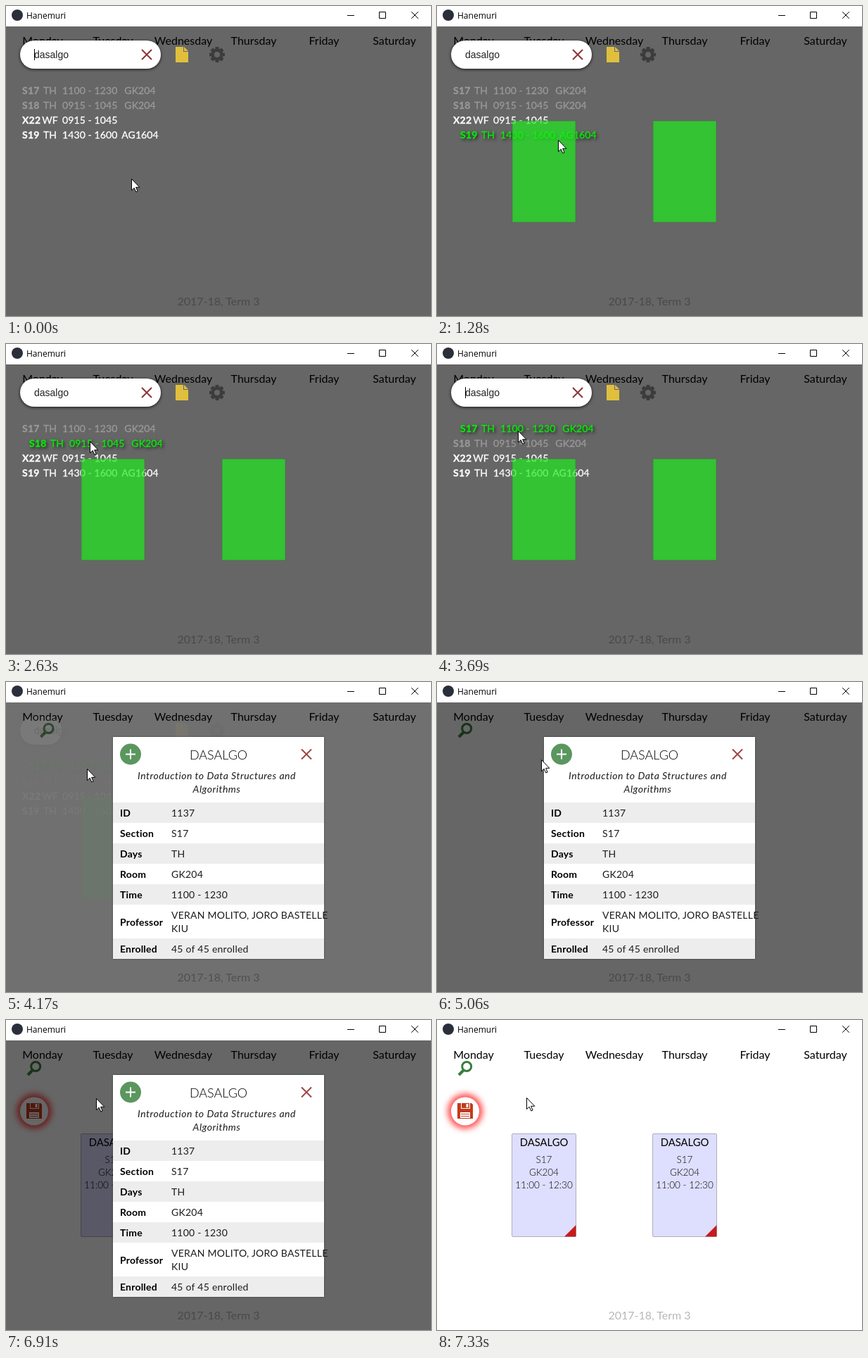
Animation of 604 by 440 pixels, one loop 7.65 s. Source, as an HTML page:

```html
<!DOCTYPE html>
<html lang="en">
<head>
<meta charset="utf-8">
<title>Class schedule</title>
<style>
  html, body { margin: 0; width: 100%; height: 100%; overflow: hidden; background: #fff; }
  svg { display: block; font: 14px Lato, Carlito, sans-serif; }
  text { white-space: pre; }
  .mid { text-anchor: middle; }
  .day, .term { font-size: 16px; }
  .term { fill: #b8b8b8; }
  .bar { font: 12px "Open Sans", sans-serif; }
  .tip { font: 12px "Open Sans", sans-serif; fill: #575757; }
  .query { font: 14px "Liberation Sans", Arial, sans-serif; fill: #222; }
  .row { stroke-width: .3px; letter-spacing: .1px; }
  .bold { font-weight: 700; letter-spacing: .2px; }
  .value { letter-spacing: .25px; fill: #1c1c1c; }
  .name { font-size: 18px; font-weight: 300; }
  .sub { font-style: italic; letter-spacing: .5px; fill: #1c1c1c; }
  .course { font-size: 14.8px; }
  .info { font-size: 13.5px; font-weight: 300; }
  .line { fill: none; }
</style>
</head>
<body>
<svg id="stage" width="604" height="440" viewBox="0 0 604 440"></svg>
<script>
const LOOP = 7650;
const DAYS = ['Monday', 'Tuesday', 'Wednesday', 'Thursday', 'Friday', 'Saturday'];

// Bursts of motion: first step, last step, number of steps
const BURSTS = [
  [380, 870, 7], [1280, 1280, 1], [1440, 1740, 5], [2030, 2300, 4], [2550, 2910, 5],
  [3250, 3250, 1], [3690, 3690, 1], [4110, 4290, 4], [4730, 5450, 11], [5880, 5880, 1],
  [6050, 6110, 2], [6570, 7150, 9], [7330, 7330, 1]
];

// Sections: code, days, time, room, full, hover start, hover end
const SECTIONS = [
  ['S17', 'TH', '1100 - 1230', 'GK204', true, 2640, 9999],
  ['S18', 'TH', '0915 - 1045', 'GK204', true, 2130, 2640],
  ['X22', 'WF', '0915 - 1045', '', false, 1500, 2130],
  ['S19', 'TH', '1430 - 1600', 'AG1604', false, 600, 1500]
];

const DETAILS = [
  ['ID', '1137'], ['Section', 'S17'], ['Days', 'TH'], ['Room', 'GK204'],
  ['Time', '1100 - 1230'], ['Professor', 'VERAN MOLITO, JORO BASTELLE', 'KIU'],
  ['Enrolled', '45 of 45 enrolled']
];

// Pointer path: time, x, y
const PATH = [
  [320, 178, 245], [640, 172, 190], [1400, 172, 190], [1740, 150, 160], [1980, 150, 160],
  [2120, 122, 149], [2270, 120, 140], [2500, 120, 140], [2850, 115, 123], [4690, 115, 123],
  [5200, 166, 103], [6540, 166, 103], [6850, 128, 111], [7300, 128, 111], [7330, 127, 110]
];

const CARET_ON = [[0, 380], [780, 1280], [1740, 2210], [2720, 3250], [3690, 4110]];

const ramp = (t, start, length) => Math.min(1, Math.max(0, (t - start) / length));
const text = (x, y, cls, s, extra = '') => `<text x="${x}" y="${y}" class="${cls}" ${extra}>${s}</text>`;
const rect = (x, y, w, h, fill, extra = '') =>
  `<rect x="${x}" y="${y}" width="${w}" height="${h}" fill="${fill}" ${extra}/>`;
const path = (d, fill, extra = '') => `<path d="${d}" fill="${fill}" ${extra}/>`;
const line = (d, color, width) => path(d, 'none', `stroke="${color}" stroke-width="${width}"`);
const circle = (x, y, r, fill, extra = '') => `<circle cx="${x}" cy="${y}" r="${r}" fill="${fill}" ${extra}/>`;
const layer = (alpha, s, move = 0) =>
  alpha > 0 ? `<g opacity="${alpha}" transform="translate(${move})">${s}</g>` : '';
const cross = (x, y, r, color, width) =>
  line(`M${x - r} ${y - r}l${2 * r} ${2 * r}m0 ${-2 * r}l${-2 * r} ${2 * r}`, color, width);

function held(t) {
  let step = 0;
  for (const [a, b, n] of BURSTS)
    for (let i = 0; i < n; i++) {
      const at = n > 1 ? a + (b - a) * i / (n - 1) : a;
      if (at <= t) step = at;
    }
  return step;
}

function pointer(t) {
  let i = PATH.findIndex(k => k[0] > t);
  if (i < 0) i = PATH.length;
  const b = PATH[Math.min(i, PATH.length - 1)], a = PATH[Math.max(i - 1, 0)];
  const p = a === b ? 0 : ramp(t, a[0], b[0] - a[0]);
  const x = Math.round(a[1] + (b[1] - a[1]) * p), y = Math.round(a[2] + (b[2] - a[2]) * p);
  return path('M.5 .5V16.7L4.2 13.2L6.8 19L9.1 18L6.6 12.3H11.8Z', '#fff',
    `stroke="#000" transform="translate(${x} ${y})"`);
}

const titleBar = () => rect(0, 0, 604, 29, '#fff') + circle(16, 13, 8, '#2b2e3b') +
  text(29, 18, 'bar', 'Hanemuri') +
  line('M485 13.5h10M530.5 8.5h9v9h-9z', '#000', 1) + cross(581, 13, 4.8, '#000', 1);

const magnifier = () => line('M37.5 71.5L31 78', '#387f3e', 4) +
  circle(42.2, 66, 6.5, 'none', 'stroke="#387f3e" stroke-width="3"');

function eventCard(x) {
  return rect(x - 45.5, 161.5, 91, 146, '#dedeff', 'rx="1.5" stroke="#aeb0b8"') +
    path(`M${x + 45.5} 291v16.5h-16.5z`, '#c41c1c') + text(x, 179, 'course mid', 'DASALGO') +
    ['S17', 'GK204', '11:00 - 12:30'].map((s, i) => text(x, 203 + 18 * i, 'info mid', s)).join('');
}

const saveButton = () => circle(40, 129.5, 25, '#ff5252', 'style="filter:blur(4px)"') +
  circle(40, 129.5, 20, '#fff') +
  path('M29 118h5v8h13v-8h2l2 2v20h-22z', '#c23a1c') + rect(35, 118, 11, 7, '#c23a1c') +
  rect(41.5, 119, 3, 5, '#fff') + rect(33, 131, 14, 8, '#fff') +
  line('M34 133.5h12M34 136.5h12', '#c23a1c', 1);

const page = (added, icon) =>
  DAYS.map((d, i) => text(52 + 100 * i, 55, 'day mid', d)).join('') +
  text(302, 425, 'term mid', '2017-18, Term 3') +
  layer(added, eventCard(152) + eventCard(352) + saveButton()) + icon;

function sectionRow([code, days, time, room, full], i, hover) {
  const y = 125 + 21 * i, base = full ? 153 : 255;
  const side = Math.round(base * (1 - hover)), green = Math.round(base + (240 - base) * hover);
  const color = `rgb(${side},${green},${side})`;
  const shadow = hover ? `filter:drop-shadow(2px 2px 2px rgba(0,0,0,${.7 * hover}))` : '';
  return `<g fill="${color}" stroke="${color}" transform="translate(${10 * hover})" style="${shadow}">` +
    text(23, y, 'row bold', code) + text(62.5, y, 'row mid', days) +
    text(80, y, 'row', time) + text(190.5, y, 'row mid', room) + '</g>';
}

const slot = col => rect(100 * col + 7, 163, 90, 144, 'rgba(30,235,30,.7)', 'stroke="#4a6e4a" stroke-width=".7"');

function gear() {
  const teeth = [0, 45, 90, 135].map(a =>
    rect(-2.6, -11, 5.2, 22, '#3c3c3c', `rx="1" transform="rotate(${a})"`)).join('');
  return `<g transform="translate(300 69)">${teeth}${circle(0, 0, 6.2, 'none',
    'stroke="#3c3c3c" stroke-width="4.5"')}${circle(0, 0, 4, '#666')}</g>`;
}

const note = () => path('M241 58h11v7h7v15h-18z', '#e0bf3e') + path('M253 58l6 6h-6z', '#e0bf3e');

function search(t, alpha) {
  const hovers = SECTIONS.map(s => ramp(t, s[5], 180) - ramp(t, s[6], 180));
  const caret = CARET_ON.some(([a, b]) => t >= a && t < b);
  const pill = rect(20, 49, 40 + 160 * alpha, 40, '#fff',
    'rx="20" style="filter:drop-shadow(0 1px 2px rgba(0,0,0,.8))"');
  return rect(0, 29, 604, 411, '#000', 'opacity=".6"') +
    SECTIONS.map((s, i) => sectionRow(s, i, hovers[i])).join('') +
    layer(hovers[0] + hovers[1] + hovers[3], slot(1) + slot(3)) +
    layer(hovers[2], slot(2) + slot(4)) +
    pill + text(40, 74, 'query', 'dasalgo') +
    (caret ? rect(40, 61, 1, 16, '#000') : '') +
    (alpha > .5 ? cross(200, 69, 7, '#8c3636', 2) : '') + note() + gear();
}

function panel(hover) {
  let y = 171;
  const rows = DETAILS.map(([label, ...lines], i) => {
    const h = 10 + 19 * lines.length, top = y;
    y += h;
    return rect(152, top, 300, h, i % 2 ? '#fff' : '#ededed') +
      text(162, top + h / 2 + 5.5, 'bold', label) +
      lines.map((s, k) => text(235, top + 20 + 19 * k, 'value', s)).join('');
  }).join('');
  const shadow = `style="filter:drop-shadow(0 0 2px rgba(0,0,0,${.8 * hover}))"`;
  return rect(152, 78, 300, 315, '#fff', 'style="filter:drop-shadow(0 0 1px rgba(0,0,0,.5))"') +
    `<g opacity="${.82 + .18 * hover}" ${shadow}>` + circle(177, 102.5, 15, '#38803d') + '</g>' +
    line('M170 102.5h14M177 95.5v14', '#fff', 2) +
    text(302, 110, 'name mid', 'DASALGO') + cross(427, 102.5, 7, '#9e4444', 2) +
    text(299.5, 138, 'sub mid', 'Introduction to Data Structures and') +
    text(299.5, 157, 'sub mid', 'Algorithms') + rows;
}

const tooltip = () => rect(167.5, 73.5, 121, 27, '#fff', 'stroke="#8a8a8a"') +
  text(228, 91, 'tip mid', 'Add to schedule');

function scene(t) {
  const open = ramp(t, 4040, 200), close = 1 - ramp(t, 6880, 250);
  const seek = (1 - open) ** 2;
  const hover = ramp(t, 5130, 200) - ramp(t, 6640, 150);
  return page(ramp(t, 5990, 120), layer(1 - seek, magnifier(), 150 * seek)) +
    layer(seek, search(t, seek)) +
    layer(Math.min(1, open * 1.35) * close * .6, rect(0, 29, 604, 411, '#000')) +
    layer(Math.min(1, open * 1.6) * close, panel(hover)) +
    (t >= 5450 && t < 5880 ? tooltip() : '') + titleBar() + pointer(t);
}

const stage = document.getElementById('stage');
const start = performance.now();
let shown = -1;

function tick() {
  const t = held((performance.now() - start) % LOOP);
  if (t !== shown) stage.innerHTML = scene(shown = t);
  requestAnimationFrame(tick);
}
tick();
</script>
</body>
</html>
```
